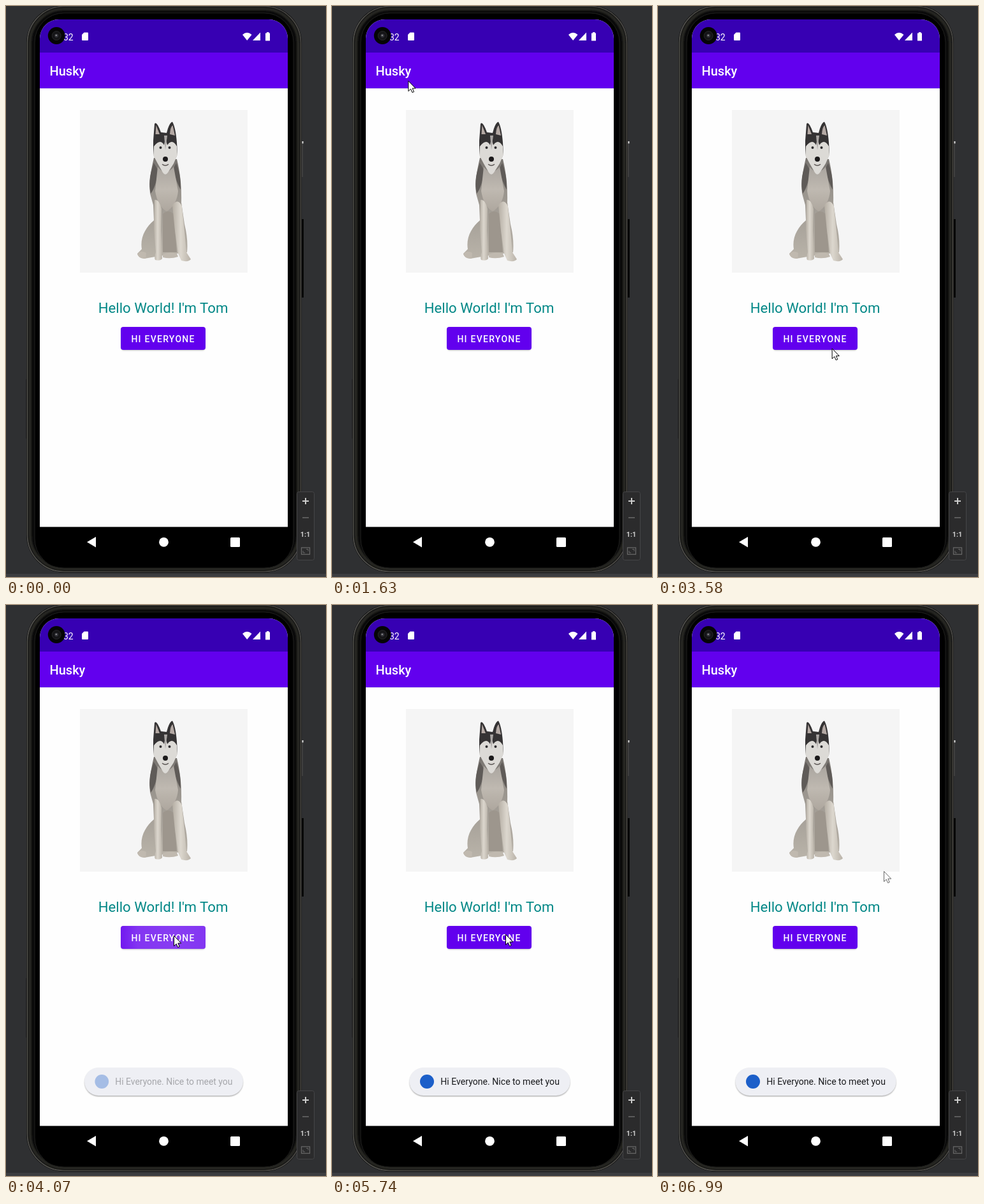
An HTML page that plays this animation: 502 px wide and 895 px high, repeating every 8 s.

```html
<!DOCTYPE html>
<html lang="en">
<head>
<meta charset="utf-8">
<title>Phone emulator</title>
<style>
html, body { margin: 0; width: 100%; height: 100%; overflow: hidden; background: #2f3032; }
svg { display: block; width: 502px; height: 895px; font-family: Roboto, sans-serif; }
</style>
</head>
<body>
<svg viewBox="0 0 502 895">
  <defs>
    <linearGradient id="rim" x1="0" x2="1">
      <stop offset="0" stop-color="#5c5b57"/><stop offset=".5" stop-color="#484744"/><stop offset="1" stop-color="#55534f"/>
    </linearGradient>
    <linearGradient id="fur" x2="0" y2="1">
      <stop offset="0" stop-color="#77736f"/><stop offset=".35" stop-color="#9a958e"/><stop offset="1" stop-color="#b9b3a9"/>
    </linearGradient>
    <linearGradient id="chest" x2="0" y2="1">
      <stop offset="0" stop-color="#aaa59f"/><stop offset=".5" stop-color="#bfb9b1"/><stop offset="1" stop-color="#aea79e"/>
    </linearGradient>
    <linearGradient id="leg" x1="0" x2="1">
      <stop offset="0" stop-color="#b5aea4"/><stop offset=".45" stop-color="#dcd7ce"/><stop offset="1" stop-color="#b9b2a8"/>
    </linearGradient>
    <radialGradient id="glow">
      <stop offset="0" stop-color="#fff"/><stop offset=".55" stop-color="#fff" stop-opacity=".85"/><stop offset="1" stop-color="#fff" stop-opacity="0"/>
    </radialGradient>
    <filter id="soft" x="-20%" y="-60%" width="140%" height="220%"><feGaussianBlur stdDeviation="1.3"/></filter>
    <filter id="wide" x="-20%" y="-80%" width="140%" height="260%"><feGaussianBlur stdDeviation="3.5"/></filter>
    <clipPath id="btn"><rect x="180" y="503" width="133" height="36" rx="4"/></clipPath>
    <clipPath id="screen"><rect x="53" y="21" width="389" height="858" rx="30"/></clipPath>
  </defs>

  <rect width="502" height="895" fill="#2f3032"/>
  <rect y="890" width="502" height="5" fill="#3c3d40"/>

  <!-- phone body -->
  <path d="M465 212V268" stroke="#414141" stroke-width="2"/>
  <path d="M465.5 212V215.5" stroke="#ddd" stroke-width="2"/>
  <path d="M465.5 334V457" stroke="#080808" stroke-width="3"/>
  <path d="M31.5 585V678" stroke="#242424"/>
  <rect x="32" y="-1" width="432" height="889" rx="59" fill="#0a0a0a"/>
  <rect x="33.5" y="0.5" width="429" height="886" rx="57.5" fill="none" stroke="url(#rim)" stroke-width="1.6"/>
  <rect x="37.5" y="4.5" width="421" height="878" rx="53.5" fill="none" stroke="#252523" stroke-width="5" filter="url(#soft)"/>
  <rect x="45" y="11" width="406" height="870" rx="46" fill="#000" stroke="#21211f"/>

  <!-- app screen -->
  <g clip-path="url(#screen)">
    <rect x="53" y="21" width="389" height="796" fill="#fefefe"/>
    <rect x="53" y="21" width="389" height="52" fill="#3700b3"/>
    <rect x="53" y="73" width="389" height="56" fill="#6200ee"/>
    <rect x="53" y="129" width="389" height="1" fill="#e9e6ee"/>
    <rect x="53" y="816.5" width="389" height="64"/>
  </g>
  <g fill="#fff">
    <text x="90" y="53.5" font-size="14">32</text>
    <path d="M122.5 41.5H128Q129 41.5 129 42.5V53Q129 54 128 54H120Q119 54 119 53V45Z"/>
    <path d="M371 45Q378 38.5 385.5 45L378.2 54Z"/>
    <path d="M399 41.5V54H387Z"/>
    <path d="M409 41H412.5V42.5H414V54.5H407V42.5H409Z"/>
    <text x="68.5" y="109" font-size="20" font-weight="500">Husky</text>
    <path d="M127 840.3L141 832V848.5Z"/>
    <circle cx="247.5" cy="840.3" r="7.4"/>
    <rect x="352" y="833" width="15" height="15" rx="1.5"/>
  </g>
  <circle cx="79.2" cy="46.5" r="13.4" fill="#050505"/>
  <circle cx="79.2" cy="46.5" r="7" fill="#151517" stroke="#26262a"/>
  <circle cx="79.2" cy="46.5" r="3" fill="#303038"/>
  <circle cx="78.8" cy="46" r="1.3" fill="#888"/>

  <!-- dog picture -->
  <rect x="116" y="163" width="263" height="255" fill="#f5f5f5"/>
  <g>
    <path d="M232 238C228 256 224 272 226 294L231 312 232 336C219 347 210 363 213 381L206 388Q207 395 217 396L240 392 284 386Q286 366 280 342L275 308Q276 272 268 240Z" fill="url(#fur)"/>
    <path d="M232 246C226 262 223 278 227 294Q235 284 239 258ZM267 246Q275 266 274 288 268 278 262 256Z" fill="#5f5b58"/>
    <path d="M238 252Q250 268 263 252L270 290Q268 312 252 322 238 314 234 290Z" fill="url(#chest)"/>
    <path d="M246 326Q254 318 263 326L268 386H246Z" fill="#9d968d"/>
    <path d="M233 304Q240 302 244 318L243 352 245 396Q242 400 234 398 232 394 235 386L232 350Z" fill="url(#leg)"/>
    <path d="M261 312Q270 300 276 314L280 352 283 386 290 397Q286 402 275 399L270 388 265 352Z" fill="url(#leg)"/>
    <path d="M206 389Q212 382 220 387L219 396Q209 396 206 389ZM246 389Q258 385 268 388L270 393Q258 397 246 394Z" fill="#c0b9af"/>
    <path d="M231 211L233 185Q236 179 243 198L252 199Q256 183 261 181.5 266 190 268 214L269 232Q264 248 250 252 236 248 231 232Z" fill="#353334"/>
    <path d="M234.5 201L235.5 187 241 201ZM257 201Q258 189 261.5 187L265 203Z" fill="#b4a9a4"/>
    <path d="M232 220Q242 207 248 218L250 207 253 218Q261 207 268 220L269 233 263 247 254 261Q250 267 246 261L238 247 231 234Z" fill="#dcdad6"/>
    <path d="M248 203L250 226 253 203Z" fill="#aaa6a4"/>
    <circle cx="242.5" cy="222" r="2" fill="#2c2b2e"/>
    <circle cx="256.5" cy="222" r="2" fill="#2c2b2e"/>
    <ellipse cx="250" cy="240" rx="4" ry="4" fill="#1c1a1b"/>
    <path d="M245 248Q250 252 255 248" fill="none" stroke="#5d5856" stroke-width="1.5"/>
  </g>

  <text x="144.7" y="481" font-size="22.2" fill="#018786">Hello World! I'm Tom</text>

  <!-- button -->
  <rect id="low" x="181" y="504" width="131" height="36" rx="4" filter="url(#soft)"/>
  <rect id="high" x="181" y="508" width="131" height="36" rx="4" filter="url(#wide)"/>
  <g clip-path="url(#btn)">
    <rect x="180" y="503" width="133" height="36" fill="#6200ee"/>
    <circle id="ripple" cx="263" cy="520" r="0" fill="url(#glow)"/>
  </g>
  <text x="196.4" y="526.5" font-size="14" font-weight="500" letter-spacing="1.25" fill="#fff">HI EVERYONE</text>

  <!-- toast -->
  <g id="toast">
    <g id="pill">
      <rect x="122" y="727" width="251" height="43" rx="21.5" opacity=".4" filter="url(#soft)"/>
      <rect x="121.5" y="725" width="252" height="44" rx="22" fill="#eeeff4"/>
    </g>
    <g id="note">
      <circle cx="149" cy="747" r="11" fill="#1c5fc9"/>
      <text x="170.3" y="752" font-size="14.1" fill="#191a1d">Hi Everyone. Nice to meet you</text>
    </g>
  </g>

  <!-- emulator tools -->
  <rect x="456.5" y="761.5" width="27" height="107" rx="3" fill="#2b2b2c" stroke="#454547"/>
  <path d="M465 776H475M470 771V781" stroke="#ccc" stroke-width="2"/>
  <path d="M465 802H475" stroke="#666" stroke-width="1.6"/>
  <text x="469.5" y="832" font-size="11" font-weight="700" text-anchor="middle" fill="#ccc">1:1</text>
  <rect x="463.5" y="849" width="13" height="10.5" fill="none" stroke="#666" stroke-width="1.3"/>
  <path d="M466 854V857H469M471 851.5H474V854.5" fill="none" stroke="#666"/>

  <path id="arrow" d="M.5.5V16.6L4.2 13.1 6.6 18.6 9.2 17.5 6.8 12.1H11.7Z" fill="#fff" stroke="#000"/>
</svg>
<script>
const LOOP = 8000;
const $ = id => document.getElementById(id);
const clamp = v => Math.max(0, Math.min(1, v));
const ramp = (t, from, to) => clamp((t - from) / (to - from));

const bursts = [
  [380, 1010, 10], [1270, 2050, 12], [2120, 2880, 11], [2950, 3720, 12], [3850, 4620, 12],
  [4690, 5460, 12], [5530, 5740, 4], [5940, 6500, 9], [6640, 6990, 6]
];

// Pointer tip: time, x, y
const path = [
  [380, 437, 847], [590, 385, 665], [800, 318, 465], [1010, 286, 386], [1200, 286, 386],
  [1624, 119.5, 117], [1838, 60, 108], [1980, 100, 101], [2050, 128, 110], [2120, 110, 103],
  [2272, 47, 98], [2424, 110, 95], [2576, 150, 112], [2660, 180, 200], [2880, 243, 451],
  [2950, 260, 500], [3160, 302, 617], [3400, 285, 560], [3720, 263, 518], [5460, 263, 518],
  [5530, 250, 518], [5600, 230, 517], [5670, 252, 517], [5740, 272, 516], [5870, 272, 516],
  [6150, 310, 470], [6360, 347, 422], [6500, 354, 417]
];

function snap(t) {
  let out = 0;
  for (const [from, to, count] of bursts) {
    if (t < from) break;
    const step = (to - from) / (count - 1);
    out = from + Math.min(count - 1, Math.floor((t - from) / step + 1e-6)) * step;
  }
  return out;
}

function pointAt(t) {
  const i = path.findIndex(p => p[0] > t);
  if (i < 0) return path[path.length - 1].slice(1);
  if (i === 0) return path[0].slice(1);
  const [a, b] = [path[i - 1], path[i]];
  const k = ramp(t, a[0], b[0]);
  return [a[1] + (b[1] - a[1]) * k, a[2] + (b[2] - a[2]) * k];
}

function drawPointer(t) {
  const [x, y] = pointAt(t);
  const hidden = t < 380 || (t > 2700 && t < 2879);
  $('arrow').setAttribute('visibility', hidden ? 'hidden' : 'visible');
  $('arrow').setAttribute('transform', `translate(${x} ${y})`);
  $('arrow').setAttribute('stroke', t > 6450 ? '#666' : '#000');
}

function drawButton(t) {
  const second = t >= 4680;
  const start = second ? 4860 : 3840;
  const age = t - start;
  const fade = second ? 1 - ramp(t, 5180, 5460) : 1 - ramp(t, 4050, 4480);
  $('ripple').setAttribute('r', age < 0 ? 0 : Math.min(170, 18 + age * 0.4));
  $('ripple').setAttribute('opacity', 0.25 * fade);
  const lift = ramp(t, 4680, 4830) * (1 - ramp(t, 5180, 5420));
  $('high').setAttribute('opacity', 0.34 * lift);
  $('low').setAttribute('opacity', 0.24 - 0.1 * lift);
}

function drawToast(t) {
  const show = t < 6550
    ? ramp(t, 3940, 4290) * (1 - ramp(t, 6270, 6500))
    : ramp(t, 6610, 6960);
  const size = show < 1 ? 0.987 : 1;
  $('note').setAttribute('opacity', show);
  $('pill').setAttribute('opacity', clamp(show * 3));
  $('toast').setAttribute('transform', `translate(247.5 747) scale(${size} 1) translate(-247.5 -747)`);
}

function draw(now) {
  const t = snap(now % LOOP);
  drawPointer(t);
  drawButton(t);
  drawToast(t);
}

function tick() {
  draw(performance.now());
  requestAnimationFrame(tick);
}
tick();
</script>
</body>
</html>
```
